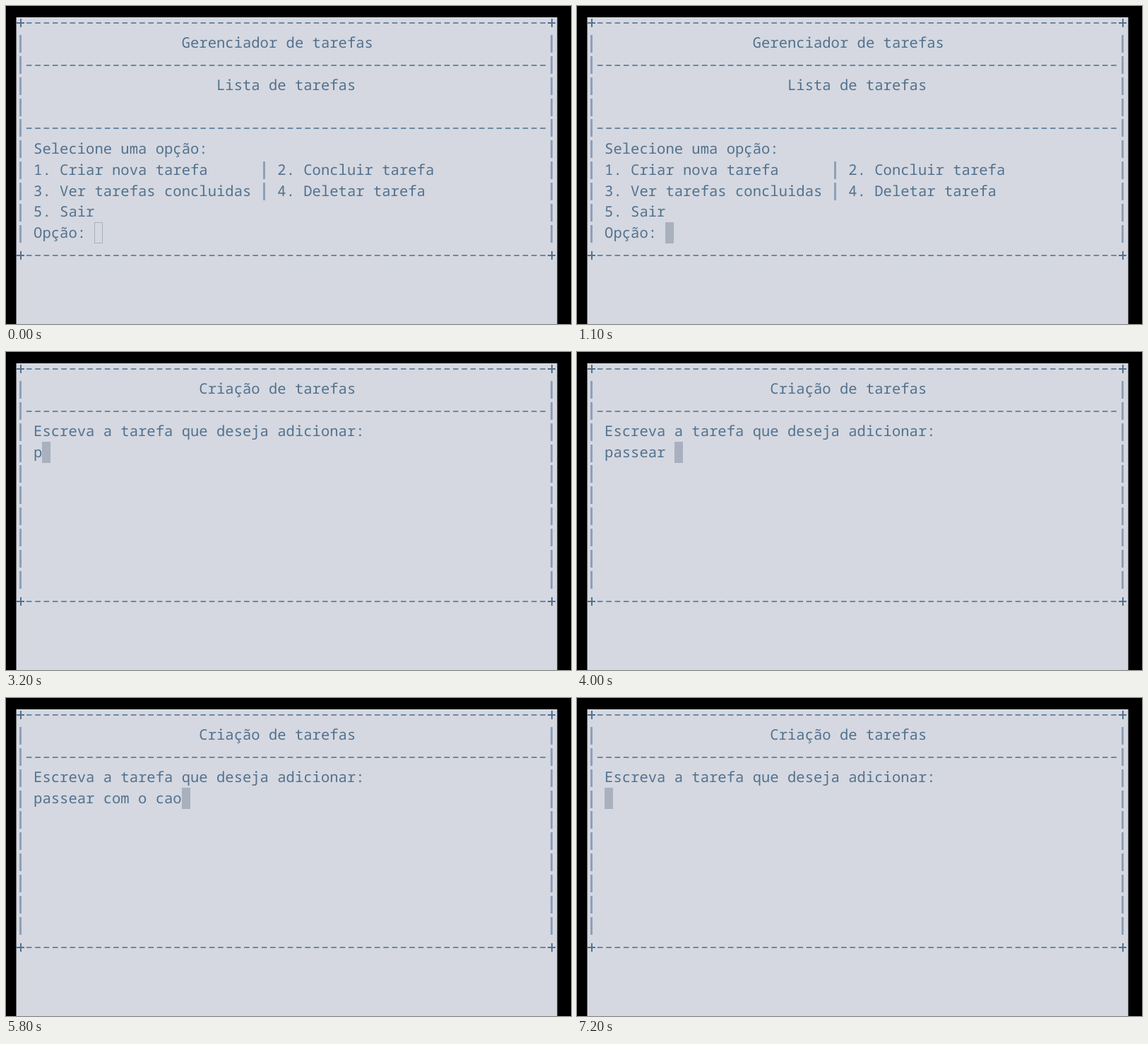
An HTML page for the animation above (8 s loop, 800x450 px).

```html
<!DOCTYPE html>
<html lang="pt-BR">
<head>
<meta charset="utf-8">
<title>Gerenciador de tarefas</title>
<style>
  html, body { margin: 0; width: 100%; height: 100%; overflow: hidden; background: #000; }
  #panel {
    position: absolute; left: 14px; top: 16px; width: 765px; height: 434px;
    border: solid #6b6c70; border-width: 0 1px;
    overflow: hidden; background: #d5d8e0;
  }
  #term {
    position: absolute; left: -.6px; top: -8.6px;
    font: 20.55px/29.88px "Noto Sans Mono", monospace;
    text-rendering: geometricPrecision;
    color: #52718f; white-space: pre;
  }
  #rows { position: relative; top: 1.2px; }
  #rows div { height: 29.88px; }
  /* box-drawing characters are painted, so their height is independent of the font */
  .bar, .dash, .plus { color: transparent; background-repeat: no-repeat; }
  .bar {
    background-image: linear-gradient(#8da0b9, #8da0b9);
    background-size: 3px 25px; background-position: 4.7px 2.5px;
  }
  .dash {
    background-image: linear-gradient(90deg, transparent 2.2px, #6d88a4 2.2px 9.8px, transparent 9.8px);
    background-size: .6em 2px; background-position: 0 14.4px; background-repeat: repeat-x;
  }
  .plus {
    background-image: linear-gradient(#52718f, #52718f), linear-gradient(#52718f, #52718f);
    background-size: 11px 2px, 2px 12px; background-position: .7px 14.4px, 5.2px 9.4px;
  }
  #cursor {
    position: absolute; width: 12px; height: 29.6px; box-sizing: border-box;
    border: 1px solid #a9b0be; background: #a9b0be;
  }
  #cursor.hollow { background: none; }
</style>
</head>
<body>
<div id="panel"><div id="term"><div id="cursor"></div><div id="rows"></div></div></div>
<script>
const LOOP = 8000, COLS = 60, CELL = 20.55 * 0.6, LINE = 29.88;
const rowsEl = document.getElementById('rows');
const cursorEl = document.getElementById('cursor');

const rule = '-'.repeat(COLS);
const at = (col, text) => ' '.repeat(col - 1) + text;
const task = 'passear com o cao';

const menu = typed => [
  at(19, 'Gerenciador de tarefas'), rule,
  at(23, 'Lista de tarefas'), '', rule,
  ' Selecione uma opção:',
  ' 1. Criar nova tarefa      | 2. Concluir tarefa',
  ' 3. Ver tarefas concluidas | 4. Deletar tarefa',
  ' 5. Sair',
  ' Opção: ' + typed
];
const create = (typed, ...more) => [
  at(21, 'Criação de tarefas'), rule,
  ' Escreva a tarefa que deseja adicionar:',
  ' ' + typed, ...more
];
const confirm = typed =>
  create(task, ' Tarefa criada. Deseja adicionar mais tarefas? (s/n)', ' ' + typed);

// time, screen lines, cursor row, cursor column, hollow cursor
const steps = [
  [0, menu(''), 10, 9, true],
  [600, menu(''), 10, 9],
  [2000, menu('1'), 10, 10],
  [2300, create(''), 4, 2]
];
const keyTimes = [3200, 3300, 3400, 3500, 3600, 3700, 3800, 3900,
  4200, 4500, 4800, 5100, 5200, 5400, 5500, 5600, 5700];
keyTimes.forEach((t, i) => steps.push([t, create(task.slice(0, i + 1)), 4, i + 3]));
steps.push(
  [6000, confirm(''), 6, 2],
  [6800, confirm('s'), 6, 3],
  [7100, create(''), 4, 2]
);

const kind = { '|': 'bar', '-': 'dash', '+': 'plus' };
const paint = line => '<div>' +
  line.replace(/[|+]|-+/g, s => `<span class="${kind[s[0]]}">${s}</span>`) + '</div>';

function show([, lines, row, col, hollow]) {
  const body = Array.from({ length: 10 }, (_, i) => '|' + (lines[i] || '').padEnd(COLS) + '|');
  const edge = '+' + rule + '+';
  rowsEl.innerHTML = [edge, ...body, edge].map(paint).join('');
  cursorEl.style.left = col * CELL + 'px';
  cursorEl.style.top = row * LINE + 'px';
  cursorEl.classList.toggle('hollow', !!hollow);
}

let current;
const start = performance.now();
function tick() {
  const t = (performance.now() - start) % LOOP;
  const step = steps.findLast(s => s[0] <= t);
  if (step !== current) show(current = step);
  requestAnimationFrame(tick);
}
tick();
</script>
</body>
</html>
```
